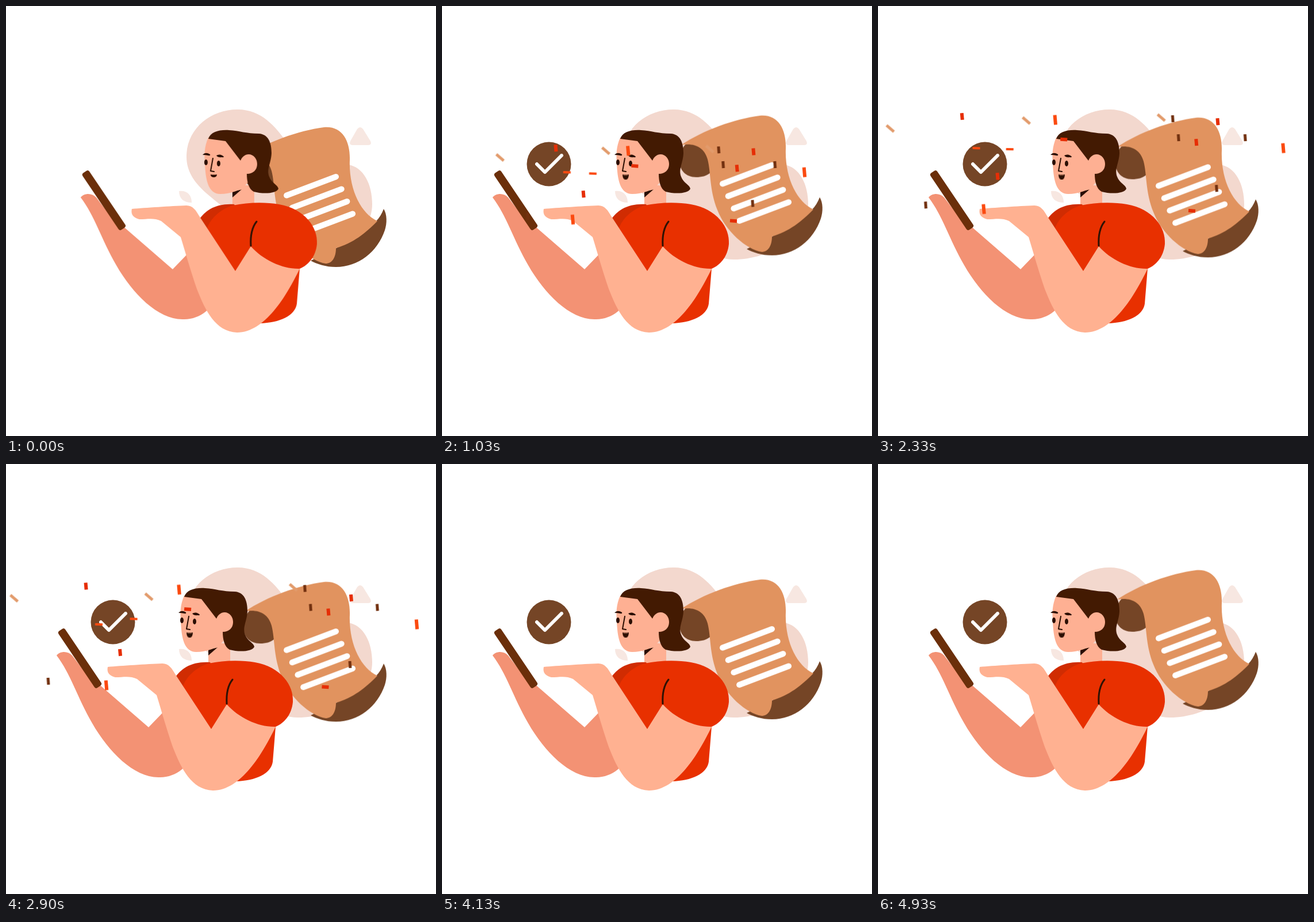
Recreate the animation shown at these times as an HTML page. Size 748x748 px, loop 5010 ms.

```html
<!DOCTYPE html>
<html lang="en">
<head>
<meta charset="utf-8">
<title>Task done</title>
<style>
  html, body { margin: 0; width: 100%; height: 100%; overflow: hidden; background: #fff; }
  svg { display: block; width: 100%; height: 100%; }

  .anim { animation: 5010ms cubic-bezier(.333, 0, .667, 1) infinite both; }
  #person { animation-name: slide; }
  #scroll { animation-name: float; }
  #badge { animation-name: pop; transform-origin: 186px 275px; }
  #check { animation-name: draw; stroke-dasharray: 1 2; }
  #mouth { animation-name: smile; transform-origin: 319px 293px; }
  #confetti g { animation-name: burst; }

  @keyframes slide {
    0% { transform: translateX(42px); }
    10%, 100% { transform: none; }
  }
  @keyframes float {
    0%, 70% { transform: none; }
    30%, 100% { transform: translateY(-26.5px); }
  }
  @keyframes pop {
    0%, 6.4% { transform: scale(0); }
    13%, 100% { transform: none; }
  }
  @keyframes draw {
    0%, 8.5% { stroke-dashoffset: 1; opacity: 0; }
    8.6% { stroke-dashoffset: 1; opacity: 1; }
    16.6%, 100% { stroke-dashoffset: 0; opacity: 1; }
  }
  @keyframes smile {
    0%, 11.5% { transform: scaleY(.55); }
    19%, 100% { transform: none; }
  }
  /* fast throw, hover at the top, then an accelerating fall */
  @keyframes burst {
    0%, 10.4% {
      transform: translate(375px, 446px); opacity: 0;
      animation-timing-function: cubic-bezier(.333, 1, .667, 1);
    }
    12% { opacity: 1; }
    36.3% { transform: translate(var(--x), var(--y)); }
    41.5% {
      transform: translate(var(--x), var(--y));
      animation-timing-function: cubic-bezier(.333, 0, .667, .333);
    }
    71% { opacity: 1; }
    75.5%, 100% { transform: translate(var(--x2), var(--y2)); opacity: 0; }
  }
</style>
</head>
<body>
<svg viewBox="0 0 748 748">
  <path fill="#f3d8ce" d="M314 262C314 215 354 180 403 180C445 180 469 211 487 235C510 262 555 272 595 276C622 280 637 310 637 345C637 400 570 441 508 441C470 441 436 412 405 372C365 335 314 312 314 262Z"/>
  <g fill="#f7e7e1">
    <path d="M611 214Q616 208 621 214L634 235Q637 242 630 242H603Q596 242 599 235Z"/>
    <path d="M301 322C314 320 323 328 323 342C309 342 301 335 301 322Z"/>
  </g>

  <g id="scroll" class="anim">
    <path fill="#754526" d="M440 252C420 256 413 276 413 289C413 306 424 318 442 318C452 318 459 316 466 311V270Z"/>
    <path fill="#754526" d="M657 353C663 362 663 378 659 390C646 428 613 454 574 454C556 454 541 449 530 443L575 421L644 374Q652 366 657 353Z"/>
    <path fill="#e1935f" d="M416 262C455 236 508 217 553 211C585 208 599 235 598 268C596 318 617 361 646 374C626 395 603 413 574 421C574 438 567 448 556 448C530 444 493 412 479 375C465 340 468 310 462 287C456 265 438 258 416 262Z"/>
    <g id="lines" stroke="#fff" stroke-width="10" stroke-linecap="round"></g>
  </g>

  <g id="person" class="anim">
    <path fill="#f39274" d="M88 333C94 325 108 325 115 333L155 385L165 386L248 458L275 430L330 510L305 532C295 540 280 546 265 545C222 545 178 500 150 451C124 406 112 364 88 333Z"/>
    <rect x="-59.500" y="-7" width="119" height="14" rx="4" fill="#6b2f0a" transform="translate(128.5 338) rotate(56)"/>

    <path fill="#feb093" d="M352 312H390V350H352Z"/>
    <path fill="#2a0e02" d="M352 323L368 319L352 333Z"/>
    <path fill="#feb093" d="M310 229C303 245 303 258 304 272C305 303 310 327 331 327C349 327 358 321 368 319L385 300L380 240L340 228Z"/>
    <path fill="#431a02" d="M310 231C314 219 329 215 346 216C364 217 376 222 398 222C414 223 420 237 420 256C419 275 411 283 416 297C420 308 431 311 432 318C428 327 404 327 389 323C380 318 377 305 377 292L366 269L340 235Z"/>
    <path fill="#feb093" d="M366 269C369 262 374 258 380 258C389 258 395 266 395 275C395 285 388 292 377 292L366 290Z"/>
    <g fill="#2a0e02">
      <path d="M300 259Q305 253 313 258Q314 261 310 260Q305 259 300 259Z"/>
      <path d="M324 260Q331 256 337 262Q337 264 333 263Q327 264 324 260Z"/>
      <ellipse cx="306" cy="272" rx="3" ry="5"/>
      <ellipse cx="328" cy="274" rx="3" ry="5"/>
      <path id="mouth" class="anim" d="M314 293Q319 295 325 293Q325 302 319 302Q314 301 314 293Z"/>
    </g>
    <path fill="none" stroke="#2a0e02" stroke-width="2" stroke-linecap="round" stroke-linejoin="round" d="M318 265L314 287L320 288"/>

    <path fill="#d02c02" d="M290 378C303 354 325 343 355 345L370 370L330 430Z"/>
    <path fill="#e83000" d="M352 347C380 341 410 341 433 345C478 353 501 385 499 414C497 436 484 451 469 457L464 518C461 539 434 551 400 552L330 520V440L308 386C314 370 330 354 352 347Z"/>
    <path fill="#ffb191" d="M177 353C200 351 245 348 272 347C283 347 289 356 294 365L357 461L384 418C405 442 440 458 469 457C446 505 408 568 360 568C322 566 305 530 290 492C279 460 270 428 262 402L228 374C216 368 204 371 190 371C179 368 175 362 177 353Z"/>
    <path fill="none" stroke="#2e1204" stroke-width="3" stroke-linecap="round" d="M394 375C386 385 383 399 384 417"/>
  </g>

  <g id="badge" class="anim">
    <circle cx="186" cy="275" r="38.500" fill="#754526"/>
    <path id="check" class="anim" pathLength="1" fill="none" stroke="#fff" stroke-width="6" stroke-linecap="round" stroke-linejoin="round" d="M165 275L179 289L208 260"/>
  </g>

  <g id="confetti"></g>
</svg>

<script>
  const make = (tag, attrs, parent) => {
    const el = document.createElementNS(parent.namespaceURI, tag);
    for (const key in attrs) el.setAttribute(key, attrs[key]);
    return parent.appendChild(el);
  };
  const byId = id => document.getElementById(id);

  for (let i = 0; i < 4; i++) {
    make('path', { d: `M${488 + 9.7 * i} ${329.5 + 21.5 * i}l86 -32.500` }, byId('lines'));
  }

  // colour, width, height, tilt
  const kinds = {
    tan: ['#e29b6c', 17, 5, 41],
    red: ['#e62e06', 6, 12, -5],
    flatRed: ['#e62e06', 12, 6, 4],
    orange: ['#fb4a10', 6, 17, -5],
    strip: ['#fb4a10', 13, 4, 2],
    dark: ['#72300f', 5, 12, -4]
  };

  // hover points of each kind; the near layer falls faster
  const far = {
    tan: [[22, 211], [492, 192]],
    red: [[147, 190], [553, 235]],
    flatRed: [[324, 230]],
    orange: [[309, 196]],
    strip: [[230, 247]],
    dark: [[512, 194], [522, 227], [638, 227]]
  };
  const near = {
    tan: [[259, 196]],
    red: [[209, 293], [590, 198]],
    flatRed: [[545, 353]],
    orange: [[185, 350], [704, 244]],
    strip: [[172, 244]],
    dark: [[84, 343], [588, 314]]
  };

  function scatter(layer, drift, fall) {
    for (const kind in layer) {
      const [fill, width, height, tilt] = kinds[kind];
      for (const [x, y] of layer[kind]) {
        const x2 = x + Math.sign(x - 375) * drift;
        const style = `--x:${x}px;--y:${y}px;--x2:${x2}px;--y2:${y + fall}px`;
        const g = make('g', { class: 'anim', style }, byId('confetti'));
        make('rect', { x: -width / 2, y: -height / 2, width, height, fill, transform: `rotate(${tilt})` }, g);
      }
    }
  }
  scatter(far, 34, 97);
  scatter(near, 45, 150);
</script>
</body>
</html>
```
